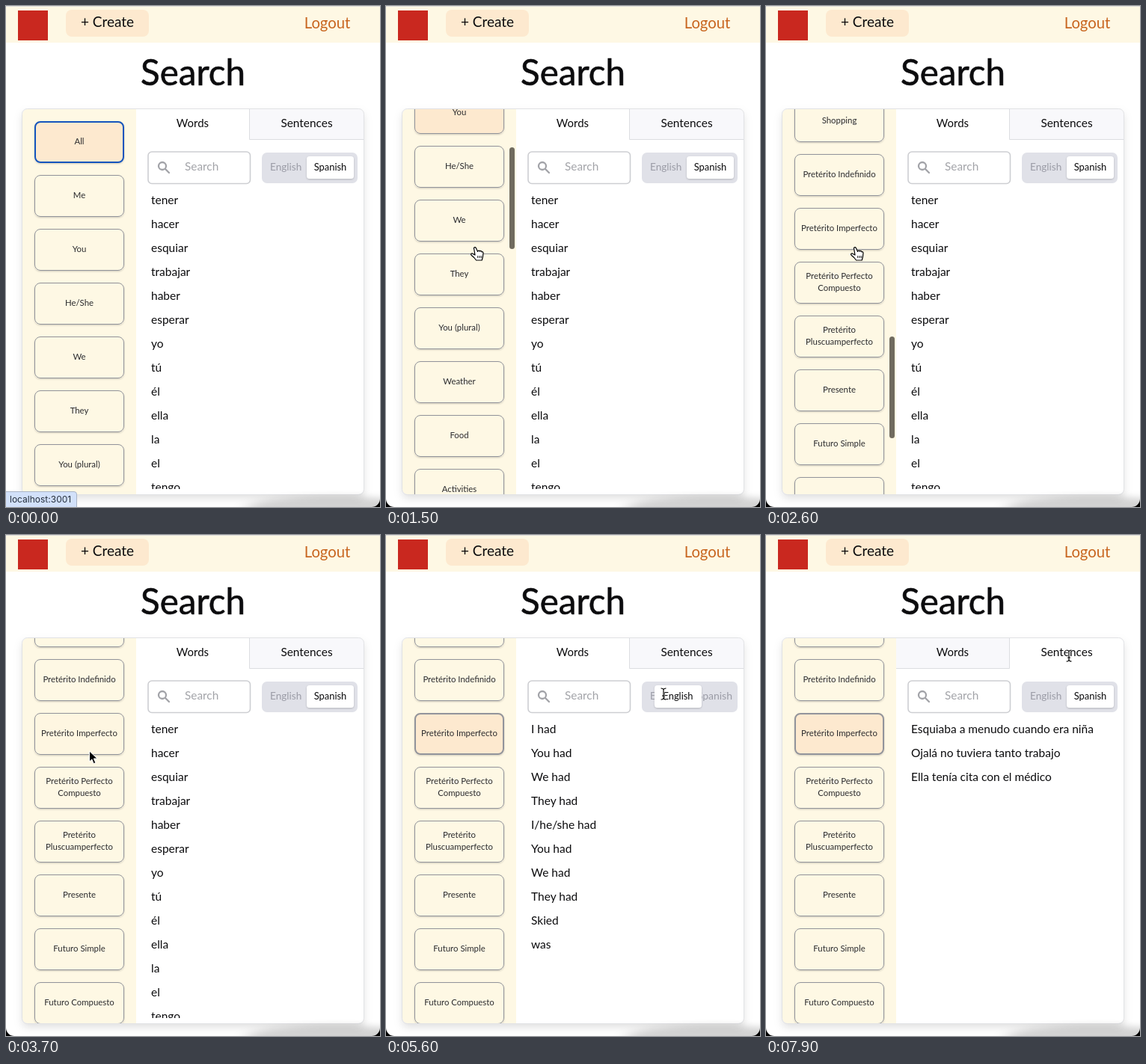
These frames come from a looping animation (500 by 670 pixels, 8 s). An HTML page:

```html
<!DOCTYPE html>
<html lang="en">
<head>
<meta charset="utf-8">
<title>Word search</title>
<style>
html, body { margin: 0; width: 100%; height: 100%; overflow: hidden; background: #fff; }
svg { display: block; width: 500px; height: 670px; }
text { font-family: Lato, "Open Sans", sans-serif; fill: #0c0c0e; white-space: pre; }
</style>
</head>
<body>
<svg id="stage" viewBox="0 0 500 670" xmlns="http://www.w3.org/2000/svg">
  <defs>
    <filter id="soft" x="-20%" y="-20%" width="140%" height="150%">
      <feDropShadow dx="0" dy="1" stdDeviation="1.2" flood-color="#000" flood-opacity=".2"/>
    </filter>
    <filter id="wide" x="-20%" y="-20%" width="140%" height="140%">
      <feDropShadow dx="0" dy="5" stdDeviation="6" flood-color="#000" flood-opacity=".13"/>
    </filter>
    <filter id="blur" x="-30%" y="-150%" width="160%" height="400%">
      <feGaussianBlur stdDeviation="11 5"/>
    </filter>
    <clipPath id="cardClip"><rect x="22" y="138" width="456" height="515" rx="7"/></clipPath>
    <clipPath id="listClip"><rect x="174" y="240" width="304" height="406"/></clipPath>
  </defs>
</svg>
<script>
const LOOP = 8000, STEP = 100;
const PEACH = '#fde9cf', CREAM = '#fef8e4', BLUE = '#1455bd', GREY = '#92949b';
const stage = document.getElementById('stage');

function add(parent, tag, attrs, content) {
  const el = document.createElementNS('http://www.w3.org/2000/svg', tag);
  set(el, attrs);
  if (content !== undefined) el.textContent = content;
  parent.appendChild(el);
  return el;
}
function set(el, attrs) {
  for (const key in attrs) el.setAttribute(key, attrs[key]);
}
const group = (parent, attrs = {}) => add(parent, 'g', attrs);
const box = (parent, x, y, width, height, rx, fill, more = {}) =>
  add(parent, 'rect', { x, y, width, height, rx, fill, ...more });
const label = (parent, str, x, y, size, more = {}) =>
  add(parent, 'text', { x, y, 'font-size': size, ...more }, str);
const middle = { 'text-anchor': 'middle' };
const tint = color => ({ style: 'fill:' + color });
const show = (el, on) => set(el, { opacity: on ? 1 : 0 });

const clamp = v => Math.max(0, Math.min(1, v));
const ramp = (t, from, length) => clamp((t - from) / length);
const easeOut = p => 1 - (1 - p) ** 2;

// Monotone cubic track through [time, value] keys
function track(keys, t) {
  const last = keys.length - 1;
  if (t <= keys[0][0]) return keys[0][1];
  if (t >= keys[last][0]) return keys[last][1];
  const slope = i => (keys[i + 1][1] - keys[i][1]) / (keys[i + 1][0] - keys[i][0]);
  const tangent = i => {
    if (i === 0 || i === last) return 0;
    const a = slope(i - 1), b = slope(i);
    return a * b > 0 ? 2 * a * b / (a + b) : 0;
  };
  let i = 0;
  while (t > keys[i + 1][0]) i++;
  const [t0, v0] = keys[i], [t1, v1] = keys[i + 1];
  const d = t1 - t0, p = (t - t0) / d, q = 1 - p;
  return v0 * (1 + 2 * p) * q * q + v1 * p * p * (3 - 2 * p)
    + d * p * q * (tangent(i) * q - tangent(i + 1) * p);
}

const SCROLL = [[1200, 0], [1500, 183], [2200, 654], [2600, 1108], [3000, 1140]];
const PATH = [
  [300, 100, 235], [900, 121, 325], [3300, 121, 325], [3700, 112, 290], [3900, 109, 272],
  [4700, 109, 272], [5300, 371, 212], [6600, 371, 212], [6800, 384, 214], [7100, 384, 214],
  [7600, 405, 161]
];
const PATH_X = PATH.map(k => [k[0], k[1]]), PATH_Y = PATH.map(k => [k[0], k[2]]);
const SHAPES = [[0, 'none'], [300, 'arrow'], [400, 'hand'], [3400, 'arrow'], [3800, 'hand'],
  [4800, 'arrow'], [5200, 'beam'], [7200, 'arrow'], [7400, 'beam']];
const HOVERS = [[1, 350, 650], [2, 750, 1900], [18, 2950, 3500], [17, 3670, 4800]];
const PICK = 4000, TO_ENGLISH = 5400, TO_SPANISH = 6900, TO_SENTENCES = 7650, SLIDE = 375;

const TOPICS = ['All', 'Me', 'You', 'He/She', 'We', 'They', 'You (plural)', 'Weather', 'Food',
  'Activities', 'Flirting', 'Travel', 'Work', 'Time', 'Numbers', 'Shopping',
  'Pretérito Indefinido', 'Pretérito Imperfecto', 'Pretérito Perfecto|Compuesto',
  'Pretérito|Pluscuamperfecto', 'Presente', 'Futuro Simple', 'Futuro Compuesto'];
const LISTS = {
  all: 'tener,hacer,esquiar,trabajar,haber,esperar,yo,tú,él,ella,la,el,tengo',
  spanish: 'tuviera,tuvieras,tuviéramos,tuvieran,tenía,tenías,teníamos,tenían,esquiaba,era',
  english: 'I had,You had,We had,They had,I/he/she had,You had,We had,They had,Skied,was',
  sentences: 'Esquiaba a menudo cuando era niña,Ojalá no tuviera tanto trabajo,Ella tenía cita con el médico'
};

// Header
box(stage, 0, 0, 500, 670, 0, '#fff');
box(stage, 0, 0, 500, 49, 0, CREAM);
box(stage, 0, 0, 500, 1, 0, '#dfdedb');
box(stage, 16, 6, 40, 40, 0, '#c9281f');
box(stage, 80, 5, 111, 36, 8, PEACH);
label(stage, '+ Create', 135.5, 27.5, 19, middle);
label(stage, 'Logout', 429.5, 30, 20.3, { ...middle, ...tint('#c8651f') });
label(stage, 'Search', 250, 106, 47.5, { ...middle, stroke: '#0c0c0e', 'stroke-width': 0.6 });

// Card
box(stage, 22, 138, 456, 515, 7, '#fff', { filter: 'url(#wide)' });
const card = group(stage, { 'clip-path': 'url(#cardClip)' });
box(card, 22, 138, 152, 515, 0, CREAM);
const side = group(card);
const buttons = TOPICS.map((name, i) => {
  const g = group(side), y = 154 + 72 * i;
  box(g, 38, y, 120, 56, 8, CREAM, { filter: 'url(#soft)' });
  const glow = box(g, 38, y, 120, 56, 8, PEACH);
  const edge = box(g, 38, y, 120, 56, 8, 'none');
  const lines = name.split('|');
  lines.forEach((line, n) => label(g, line, 98, y + 31 + 16 * (n - (lines.length - 1) / 2), 11.4,
    { ...middle, ...tint('#2b2b2e') }));
  return { glow, edge, y };
});
const thumbBar = box(card, 165, 139, 7, 136, 3.5, '#706b5f');

// Keep the border inside the 120 x 56 button
function outline({ edge, y }, color, w) {
  set(edge, {
    x: 38 + w / 2, y: y + w / 2, width: 120 - w, height: 56 - w, rx: 8 - w / 2,
    stroke: color, 'stroke-width': w
  });
}

// Tabs
function makeTab(x, w, border) {
  const g = group(card);
  box(g, x, 138, w, 41, 0, '#f8f8fb');
  add(g, 'path', { d: border, fill: 'none', stroke: '#dcdde1' });
  return g;
}
const wordsOff = makeTab(174, 152, 'M174 178.5H325.5V138');
const sentencesOff = makeTab(325, 153, 'M478 178.5H325.5V138');
label(card, 'Words', 249.5, 162, 15, middle);
label(card, 'Sentences', 402, 162, 15.4, middle);

// Search field
box(card, 190, 195, 136.5, 42.5, 5, '#fff', { stroke: '#cdced2', 'stroke-width': 1.6 });
add(card, 'path', {
  d: 'M214 214a5 5 0 1 1-10 0a5 5 0 1 1 10 0M213 218L218 223',
  fill: 'none', stroke: '#a2a3a8', 'stroke-width': 2.3, 'stroke-linecap': 'round'
});
label(card, 'Search', 239, 220, 15.4, tint('#a3a4a9'));

// Language switch
box(card, 342, 196, 128, 41, 7, '#e0e1e8');
label(card, 'English', 353, 220, 13.6, tint('#9b9ca6'));
label(card, 'Spanish', 463, 220, 14, { 'text-anchor': 'end', ...tint('#9b9ca6') });
const knob = group(card);
box(knob, 402, 201, 63, 30, 4, '#fff', { filter: 'url(#soft)' });
const knobText = label(knob, 'Spanish', 433.5, 220, 12.9, middle);

// Result lists
const results = group(card, { 'clip-path': 'url(#listClip)' });
const lists = {};
for (const key in LISTS) {
  lists[key] = group(results);
  LISTS[key].split(',').forEach((s, i) => label(lists[key], s, 194, 265 + 32 * i, 15.5));
}
box(stage, 21.5, 137.5, 457, 516, 7, 'none', { stroke: '#e1e2e5' });

// Window bottom and status bar
add(stage, 'ellipse', { cx: 440, cy: 671, rx: 118, ry: 15, fill: '#000', opacity: 0.17, filter: 'url(#blur)' });
add(stage, 'path', { d: 'M0 659A11 11 0 0 0 11 670H0ZM500 659A11 11 0 0 1 489 670H500Z', fill: '#000' });
const status = group(stage);
add(status, 'path', { d: 'M-1 649.5H91Q94.5 649.5 94.5 653V671H-1Z', fill: '#d2e1fa', stroke: '#a9b4c6' });
label(status, 'localhost:3001', 5, 664, 12, { style: 'font-family:Inter,sans-serif;fill:#26303e' });

// Pointer, with its hot spot at the origin
const pointer = group(stage);
const ink = { fill: '#fff', stroke: '#000', 'stroke-width': 1.2, 'stroke-linejoin': 'round' };
const shapes = { arrow: group(pointer), hand: group(pointer), beam: group(pointer) };
add(shapes.arrow, 'path', {
  ...ink, fill: '#000', stroke: '#fff', 'stroke-width': 1,
  d: 'M-.5-1V13L2.8 10L5.2 15.7L7.8 14.6L5.4 9H10Z'
});
add(shapes.hand, 'path', {
  ...ink,
  d: 'M-3.3 0C-4.4-2-1.7-3.2-.6-1.2L1.6 3.4C2.1 1.7 4 1.9 4.4 3.1C5.3 1.9 6.9 2.6 7 3.9C8.1 3.1 9 4 9 5.5L8.4 10.5L7.2 15H-.4L-3.2 11.5L-6.9 8.2C-8.5 6.4-6.2 5.2-4.7 6.4L-2 8Z'
});
add(shapes.hand, 'path', { ...ink, d: 'M1.7 9V12M4 9V12M6.2 9V12', 'stroke-width': 0.9 });
const beamPath = 'M-3.5-7Q0-7 0-4.5Q0-7 3.5-7M0-5V5.5M-3.5 8Q0 8 0 5.5Q0 8 3.5 8M-2 3H2';
add(shapes.beam, 'path', { d: beamPath, fill: 'none', stroke: '#fff', 'stroke-width': 2.6 });
add(shapes.beam, 'path', { d: beamPath, fill: 'none', stroke: '#000', 'stroke-width': 1.2 });

function render(t) {
  const scroll = track(SCROLL, t);
  set(side, { transform: `translate(0 ${-scroll})` });
  set(thumbBar, { y: 139 + 0.2735 * scroll, opacity: ramp(t, 1150, 150) * (1 - ramp(t, 3100, 300)) });

  const picked = t < PICK ? 0 : 17;
  const focused = t < TO_ENGLISH;
  buttons.forEach((button, i) => {
    const on = i === picked;
    let heat = on ? 1 : 0;
    for (const [n, from, to] of HOVERS)
      if (n === i) heat = Math.max(heat, ramp(t, from, 150) * (1 - ramp(t, to, 150)));
    set(button.glow, { opacity: heat });
    outline(button, on && focused ? BLUE : GREY, on ? 2 : 1);
  });

  const english = t >= TO_ENGLISH && t < TO_SPANISH;
  const slide = easeOut(ramp(t, TO_ENGLISH, SLIDE)) - easeOut(ramp(t, TO_SPANISH, SLIDE));
  set(knob, { transform: `translate(${-55 * slide} 0)` });
  knobText.textContent = english ? 'English' : 'Spanish';

  const sentences = t >= TO_SENTENCES;
  show(wordsOff, sentences);
  show(sentencesOff, !sentences);
  const current = sentences ? 'sentences' : t < PICK ? 'all' : english ? 'english' : 'spanish';
  for (const key in lists) show(lists[key], key === current);

  set(status, { opacity: 1 - ramp(t, 200, 300) });
  set(pointer, { transform: `translate(${track(PATH_X, t)} ${track(PATH_Y, t)})` });
  const [, shape] = SHAPES.filter(([from]) => t >= from).pop();
  for (const key in shapes) show(shapes[key], key === shape);
}

const start = performance.now();
function tick() {
  const t = Math.max(0, performance.now() - start) % LOOP;
  render(Math.floor(t / STEP) * STEP);
  requestAnimationFrame(tick);
}
tick();
</script>
</body>
</html>
```
